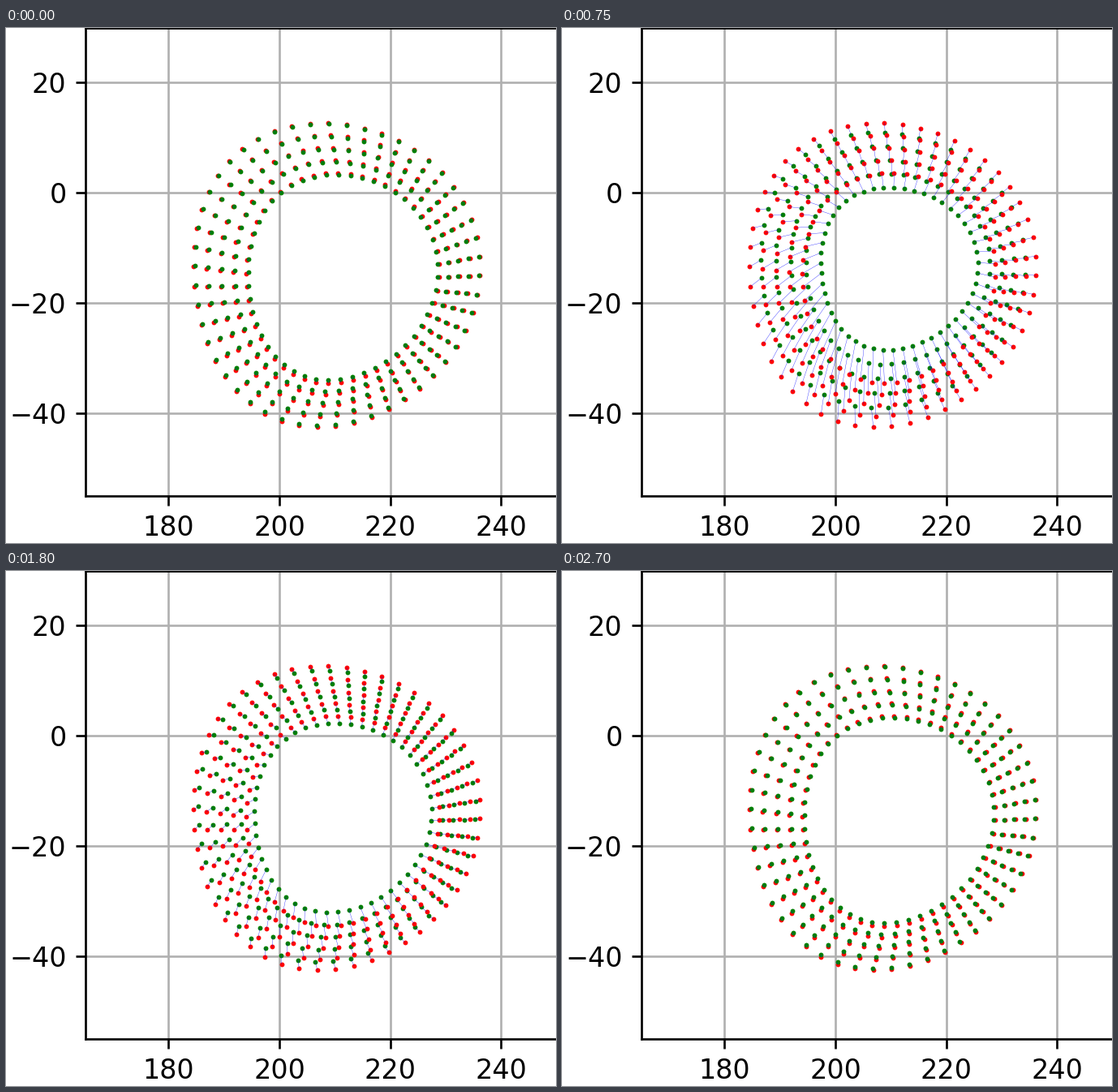
Write a matplotlib script that moves like this. It is 678x635 px and loops after 2.85 s.

```python
import numpy as np
import matplotlib.pyplot as plt
from matplotlib.animation import FuncAnimation

W, H, DPI = 678, 635, 240
LEFT, RIGHT, TOP, BOTTOM = 97.9, 678.66, -0.45, 576.7
XLIM, YLIM = (165, 250), (-55, 30)
SPOKES, LAYERS, FRAMES = 50, 5, 19

# Frame: squeeze, twist and lift of the inner wall, in stage pixels.
BEAT = {0: (2.4, 1.1, -0.8),
        1: (4.5, 1.7, -1.7),
        4: (23.5, 6.8, -9.5),
        7: (22.5, 6.8, -9.3),
        9: (17.4, 7.2, -4.9),
        12: (10.6, 4.7, -3.5),
        14: (5.0, 2.2, -1.6),
        18: (2.4, 1.1, -0.8)}
times = np.array(list(BEAT))
values = np.array(list(BEAT.values()))
slopes = np.gradient(values, times, axis=0)

# Complex stage coordinates: rows are layers (outer first), columns spokes.
phase = 2 * np.pi * np.arange(SPOKES) / SPOKES


def wave(k):
    return np.exp(1j * k * phase)


def across(outer, inner):
    """Value for each layer, from the outer wall to the inner one."""
    return np.linspace(outer, inner, LAYERS)[:, None]


contour = ((-28.8 - 180.5j) * wave(1) + (0.7 + 0.4j) * wave(2)
           + (-3.9 + 0.5j) * wave(-2) + 1j * wave(-3)
           + (1.5 - 0.3j) * wave(4))
rest = (across(403.5 + 301.5j, 412.2 + 306.2j)
        + across(1, 0.682) * contour
        + across(1.7 - 5j, 2.8 - 4.8j) * wave(-1))

squeeze_mode = across(0.6, 1) * (1j * wave(1) + (-0.09 + 0.13j) * wave(-1)
                                 + (-0.075 - 0.02j) * wave(2) - 0.04)
twist_mode = across(0.78, 1) * wave(1)
lift_mode = across(0.5, 1) * 1j


def beat(t):
    """Cubic Hermite curve through the keys of the beat."""
    i = min(np.searchsorted(times, t, side="right") - 1, len(times) - 2)
    span = times[i + 1] - times[i]
    u = (t - times[i]) / span
    blend = u * u * (3 - 2 * u)
    return ((1 - blend) * values[i] + blend * values[i + 1]
            + span * u * (1 - u) * ((1 - u) * slopes[i] - u * slopes[i + 1]))


def wall(t):
    squeeze, twist, lift = beat(t)
    return (rest + squeeze * squeeze_mode + twist * twist_mode
            + lift * lift_mode)


def to_data(z):
    x = XLIM[0] + (z.real - LEFT) / (RIGHT - LEFT) * (XLIM[1] - XLIM[0])
    y = YLIM[1] - (z.imag - TOP) / (BOTTOM - TOP) * (YLIM[1] - YLIM[0])
    return x, y


fig = plt.figure(figsize=(W / DPI, H / DPI), dpi=DPI, facecolor="white")
ax = fig.add_axes([LEFT / W, 1 - BOTTOM / H,
                   (RIGHT - LEFT) / W, (BOTTOM - TOP) / H])
ax.set(xlim=XLIM, ylim=YLIM,
       xticks=range(180, 241, 20), yticks=range(-40, 21, 20))
ax.grid(True)

# Layers are stacked outside in, so inner resting dots cover outer moving ones.
dot = dict(marker="o", ls="", ms=1.75, mew=0)
dots, links = [], []
for layer in rest:
    ax.plot(*to_data(layer), color="red", **dot)
    dots += ax.plot([], [], color="green", **dot)
    links += ax.plot([], [], color="blue", lw=0.1)


def update(frame):
    for start, end, moving, link in zip(rest, wall(frame), dots, links):
        moving.set_data(*to_data(end))
        gap = np.full(SPOKES, complex(np.nan, np.nan))
        link.set_data(*to_data(np.column_stack([start, end, gap]).ravel()))
    return dots + links


anim = FuncAnimation(fig, update, frames=FRAMES, interval=150,
                     repeat=True, repeat_delay=0, blit=False)
plt.show()
```
